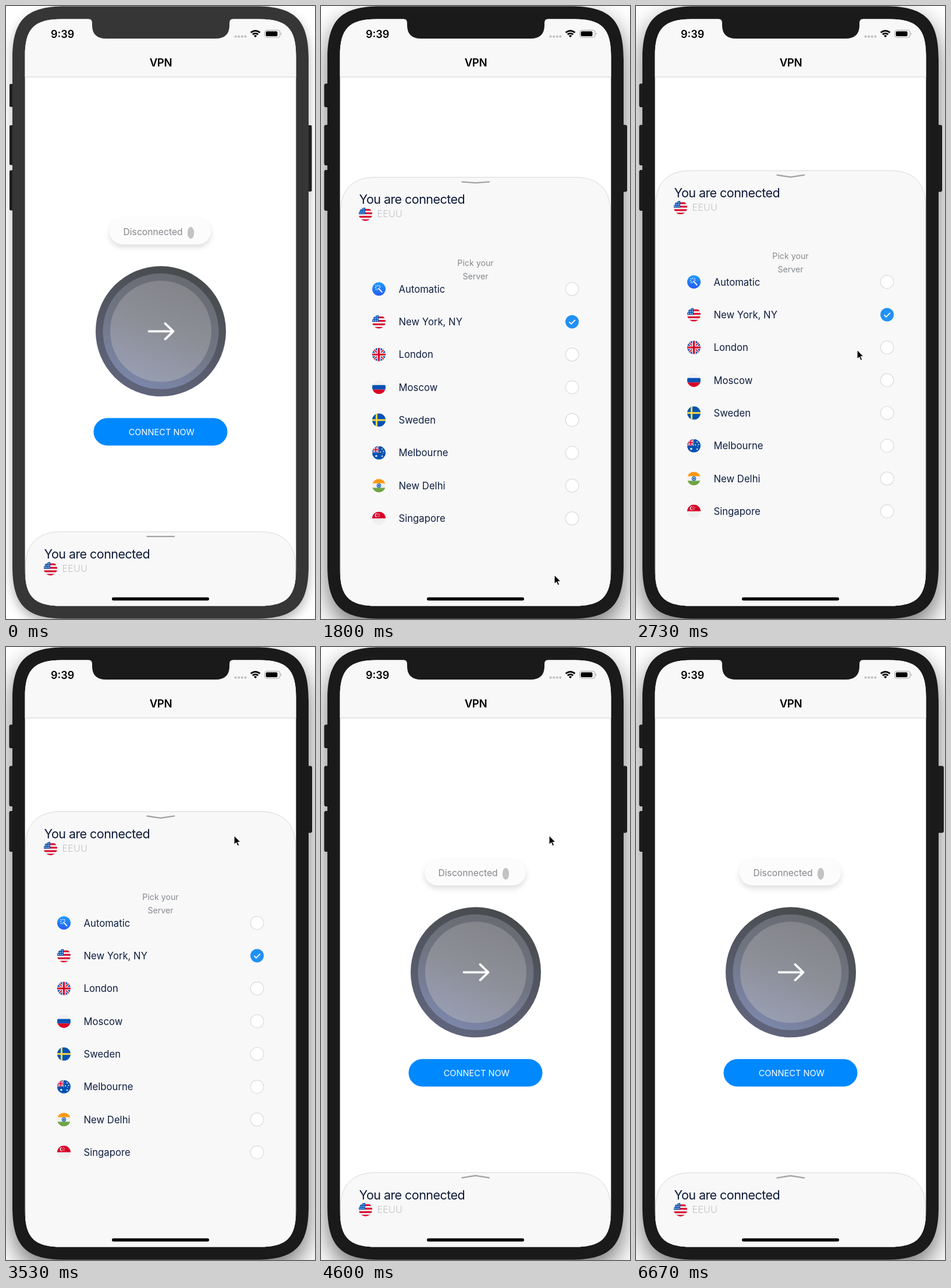
An HTML page for the animation above (6740 ms loop, 531x1054 px).

```html
<!DOCTYPE html>
<html lang="en">
<head>
<meta charset="utf-8">
<title>VPN</title>
<style>
  html, body { margin: 0; width: 100%; height: 100%; overflow: hidden; background: #fff; }
  svg { display: block; width: 100vw; height: 100vh; font-family: Inter, Roboto, sans-serif; }
  .case { fill: #363636; }
  #bezel { filter: drop-shadow(0 8px 9px rgba(0, 0, 0, .3)); }
  .keys { fill: #232323; }
  .focused .case { fill: #1a1a1a; }
  .focused #bezel { filter: drop-shadow(0 18px 21px rgba(0, 0, 0, .55)); }
  .focused .keys { fill: #262626; stroke: #151515; }
  .pill { fill: #fcfcfc; filter: drop-shadow(0 5px 5px rgba(0, 0, 0, .13)); }
  .mid { text-anchor: middle; }
  .hint { font-size: 14.2px; fill: #85898f; }
  .item { font-size: 16.7px; fill: #0f1f40; }
</style>
</head>
<body>
<svg id="stage" viewBox="0 0 531 1054" preserveAspectRatio="none">
  <defs>
    <clipPath id="screen"><path id="glass"/></clipPath>
    <clipPath id="disc"><circle cx="12" cy="12" r="12"/></clipPath>
    <clipPath id="canton"><path d="M0 0H12V12H0z"/></clipPath>
    <linearGradient id="outer" x1=".7" y1="0" x2=".3" y2="1">
      <stop stop-color="#464a4b"/><stop offset="1" stop-color="#62667e"/>
    </linearGradient>
    <linearGradient id="middle" x1=".7" y1="0" x2=".3" y2="1">
      <stop stop-color="#686a70"/><stop offset=".5" stop-color="#717583"/><stop offset="1" stop-color="#7c88ac"/>
    </linearGradient>
    <linearGradient id="inner" x1=".7" y1="0" x2=".3" y2="1">
      <stop stop-color="#838489"/><stop offset=".5" stop-color="#8d8f98"/><stop offset="1" stop-color="#989eb3"/>
    </linearGradient>
    <linearGradient id="auto" x1="0" y1="0" x2="0" y2="1">
      <stop stop-color="#1e9bfb"/><stop offset="1" stop-color="#245cf5"/>
    </linearGradient>
  </defs>

  <g class="keys">
    <rect x="6" y="134" width="10" height="39.5" rx="2"/>
    <rect x="6" y="205" width="10" height="68.5" rx="2"/>
    <rect x="6" y="282.5" width="10" height="69" rx="2"/>
    <rect id="power" x="512" y="205" width="13.5" height="114" rx="2"/>
  </g>
  <path id="bezel" class="case"/>

  <g clip-path="url(#screen)">
    <path d="M32 22H499V1032H32z" fill="#fff"/>
    <path d="M32 22H499V122H32z" fill="#f8f8f8"/>
    <path d="M32 122H499" stroke="#cfcfcf"/>
    <text class="mid" x="266" y="104" font-size="18.6" font-weight="600" letter-spacing="-.3">VPN</text>

    <rect class="pill" x="178" y="365" width="174" height="45" rx="22.5"/>
    <text x="201.5" y="394.3" font-size="15.7" fill="#85868c">Disconnected</text>
    <ellipse cx="317.5" cy="390" rx="5.7" ry="10.2" fill="#c3c3c3"/>

    <circle cx="266" cy="559.3" r="112" fill="url(#outer)"/>
    <circle cx="266" cy="559.3" r="99.5" fill="url(#middle)"/>
    <circle cx="266" cy="559.3" r="87" fill="url(#inner)"/>
    <path d="M245.5 559.3H287M273.5 545.8L287.5 559.3L273.5 572.8" fill="none" stroke="#fff" stroke-width="3.8" stroke-linecap="round" stroke-linejoin="round"/>

    <rect x="150.5" y="708.5" width="230" height="47.3" rx="23.65" fill="#08f"/>
    <text class="mid" x="267.3" y="738.3" font-size="14.6" fill="#fff">CONNECT NOW</text>

    <g id="sheet">
      <path d="M33.5 800V60C33.5 20 56 0 94 0H437C475 0 497.5 20 497.5 60V800z" fill="#f8f8f8" stroke="#d6d6d6"/>
      <path id="handle" fill="none" stroke="#a2a2a4" stroke-width="2.3" stroke-linecap="round" stroke-linejoin="round"/>
      <text x="65.5" y="46" font-size="21.5" letter-spacing="-.55" fill="#0b1836">You are connected</text>
      <g id="current"></g>
      <text x="96.5" y="69" font-size="16" font-weight="300" letter-spacing=".2" fill="#c2c3c7">EEUU</text>
      <g id="list">
        <text class="mid hint" x="265.5" y="152">Pick your</text>
        <text class="mid hint" x="265.5" y="174.5">Server</text>
      </g>
    </g>
    <rect x="182" y="1016.8" width="167" height="5.4" rx="2.7"/>
  </g>

  <path class="case" d="M141 22Q148 22 148 29V33Q148 56 172 56H360Q384 56 384 33V29Q384 22 391 22V18H141z"/>
  <text x="77" y="54.5" font-size="18" font-weight="600">9:39</text>
  <path d="M394.5 52.5h17" stroke="#bfbfc1" stroke-width="4.2" stroke-linecap="round" stroke-dasharray="0 5.6"/>
  <g fill="none" stroke="#000" stroke-width="2.8">
    <path d="M420.7 45.8A11 11 0 0 1 436.3 45.8M423.8 49A6.6 6.6 0 0 1 433.2 49"/>
    <path d="M428.5 54l-2.7 -2.7a3.8 3.8 0 0 1 5.4 0z" fill="#000" stroke="none"/>
  </g>
  <rect x="444.5" y="41.5" width="26.5" height="12.5" rx="3.8" fill="none" stroke="#a5a5a5"/>
  <rect x="446.5" y="43.5" width="20" height="8.5" rx="2"/>
  <path d="M472.5 45.8Q474.5 47.8 472.5 49.8z" fill="#999"/>

  <path id="cursor" d="M0 0V16L3.7 12.6L6 18.2L8.7 17L6.4 11.6H11.3z" stroke="#fff" stroke-width="1.1"/>
</svg>

<script>
const LOOP = 6740;
const $ = id => document.getElementById(id);
const RED = '#d80027', BLUE = '#0052b4', WHITE = '#f0f0f0', YELLOW = '#ffda44';

const box = (x, y, w, h, color) => `<rect x="${x}" y="${y}" width="${w}" height="${h}" fill="${color}"/>`;
const dot = (x, y, r, color = WHITE) => `<circle cx="${x}" cy="${y}" r="${r}" fill="${color}"/>`;
const line = (d, color, width) => `<path d="${d}" fill="none" stroke="${color}" stroke-width="${width}"/>`;
const bands = (...colors) => colors.map((c, i) => box(0, i * 24 / colors.length, 24, 24 / colors.length, c)).join('');

// Rectangle with continuous-curvature corners.
function squircle(x, y, w, h, radius) {
  const a = radius * 1.35, b = a * .75, c = a - b;
  return `M${x + a} ${y}h${w - 2 * a}c${b} 0 ${a} ${c} ${a} ${a}v${h - 2 * a}c0 ${b} ${-c} ${a} ${-a} ${a}` +
    `h${2 * a - w}c${-b} 0 ${-a} ${-c} ${-a} ${-a}v${2 * a - h}c0 ${-b} ${c} ${-a} ${a} ${-a}z`;
}

const unionJack = box(0, 0, 24, 24, BLUE) +
  line('M0 0L24 24M24 0L0 24', WHITE, 4.4) + line('M0 0L24 24M24 0L0 24', RED, 1.8) +
  line('M12 0V24M0 12H24', WHITE, 6.2) + line('M12 0V24M0 12H24', RED, 3.2);

const flags = {
  usa: box(0, 0, 24, 24, WHITE) +
    [2.6, 8.9, 15.1, 21.4].map(y => box(0, y, 24, 3.1, RED)).join('') +
    box(0, 0, 11.5, 12, BLUE) +
    [3, 6.4, 9.8].map(y => [2.2, 5.6, 9].map(x => dot(x, y, .95)).join('')).join(''),
  auto: box(0, 0, 24, 24, 'url(#auto)') +
    line('M11 10.5L18 18', '#fff', 1.9) +
    line('M10 4.5V7M5 9.5H7.5M6 5.5L7.8 7.3M14 5.5L12.2 7.3M6 13.5L7.8 11.7M9.5 12V14.5M12.5 9H15', '#fff', 1.1),
  uk: unionJack,
  russia: bands(WHITE, BLUE, RED),
  sweden: box(0, 0, 24, 24, BLUE) + line('M7.8 0V24M0 12H24', YELLOW, 3.2),
  australia: box(0, 0, 24, 24, BLUE) +
    `<g clip-path="url(#canton)"><g transform="scale(.52)">${unionJack}</g></g>` +
    dot(7.2, 17.6, 1.8) + dot(17.7, 5.2, 1.1) + dot(14.8, 10.4, 1.1) +
    dot(20.3, 9.5, 1.1) + dot(17.8, 18, 1.3) + dot(18.8, 12.8, .7),
  india: bands('#ff9811', WHITE, '#6da544') + dot(12, 12, 3.8, BLUE) + dot(12, 12, 2.6) + dot(12, 12, 1.6, BLUE),
  singapore: bands(RED, WHITE) + dot(8.3, 6.5, 3.5) + dot(9.8, 6.5, 3.2, RED) +
    [[11.5, 3.8], [9.7, 5.5], [13.3, 5.5], [10.4, 8], [12.6, 8]].map(([x, y]) => dot(x, y, .75)).join('')
};

const badge = (name, cx, cy) =>
  `<g transform="translate(${cx - 11.5} ${cy - 11.5}) scale(.958)"><g clip-path="url(#disc)">${flags[name]}</g></g>`;

const servers = [
  ['auto', 'Automatic'], ['usa', 'New York, NY'], ['uk', 'London'], ['russia', 'Moscow'],
  ['sweden', 'Sweden'], ['australia', 'Melbourne'], ['india', 'New Delhi'], ['singapore', 'Singapore']
];

$('bezel').setAttribute('d', squircle(11, .5, 509, 1053, 68));
$('glass').setAttribute('d', squircle(32.6, 22.6, 465.8, 1009, 47));
$('current').innerHTML = badge('usa', 76.5, 63.5);
$('list').innerHTML += servers.map(([flag, name], i) => {
  const y = 191.4 + i * 56.35;
  const radio = i === 1
    ? dot(431.5, y, 11.5, '#2190f5') + line(`M426.5 ${y + .3}l3.5 3.5l6.7 -6.9`, '#fff', 1.9)
    : `<circle cx="431.5" cy="${y}" r="11.3" fill="#fff" stroke="#dadada" stroke-width="1.2"/>`;
  return badge(flag, 99.5, y) + `<text class="item" x="133.5" y="${y + 6.2}">${name}</text>` + radio;
}).join('');

// Underdamped spring from 0 to 1, time in ms.
function spring(ms) {
  if (ms <= 0) return 0;
  const t = ms / 1000, decay = 11, freq = 10.45;
  return 1 - Math.exp(-decay * t) * (Math.cos(freq * t) + decay / freq * Math.sin(freq * t));
}

// Linear interpolation over [time, ...values] keys.
function track(keys, t) {
  const next = keys.findIndex(k => k[0] > t);
  if (next === 0) return keys[0].slice(1);
  if (next < 0) return keys[keys.length - 1].slice(1);
  const a = keys[next - 1], b = keys[next], f = (t - a[0]) / (b[0] - a[0]);
  return a.slice(1).map((v, i) => v + (b[i + 1] - v) * f);
}

const OPEN_Y = 283, CLOSED_Y = 904, OPEN_AT = 1586, CLOSE_AT = 4061;
const cursorKeys = [
  [270, 488, 1054], [420, 465, 1036], [700, 402, 1020], [1100, 398, 990], [1380, 401, 978],
  [2450, 401, 978], [2560, 394, 850], [2730, 380, 593], [2920, 388, 256], [3060, 395, 314],
  [3250, 392, 324], [5680, 392, 324], [5900, 445, 290], [6100, 520, 262], [6200, 540, 256]
];
const bendKeys = [[1650, 0], [1950, 1], [4130, 1], [4400, -1]];
const powerKeys = [[6080, 0], [6200, 4.5], [6500, 4.5], [6670, 2.8]];

function draw(t) {
  const closed = 1 - spring(t - OPEN_AT) + spring(t - CLOSE_AT);
  const [bend] = track(bendKeys, t);
  const [x, y] = track(cursorKeys, t);
  const arm = 8.2 - .6 * bend;

  $('stage').classList.toggle('focused', t >= 1530);
  $('sheet').setAttribute('transform', `translate(0 ${OPEN_Y + (CLOSED_Y - OPEN_Y) * closed})`);
  $('list').setAttribute('transform', `translate(0 ${40 * closed})`);
  $('handle').setAttribute('d', `M242.5 ${arm}L265.5 ${8.2 + 3 * bend}L289 ${arm}`);
  $('power').setAttribute('width', 13.5 + track(powerKeys, t)[0]);
  $('cursor').setAttribute('transform', `translate(${x} ${y})`);
}

function tick() {
  draw(performance.now() % LOOP);
  requestAnimationFrame(tick);
}
tick();
</script>
</body>
</html>
```
